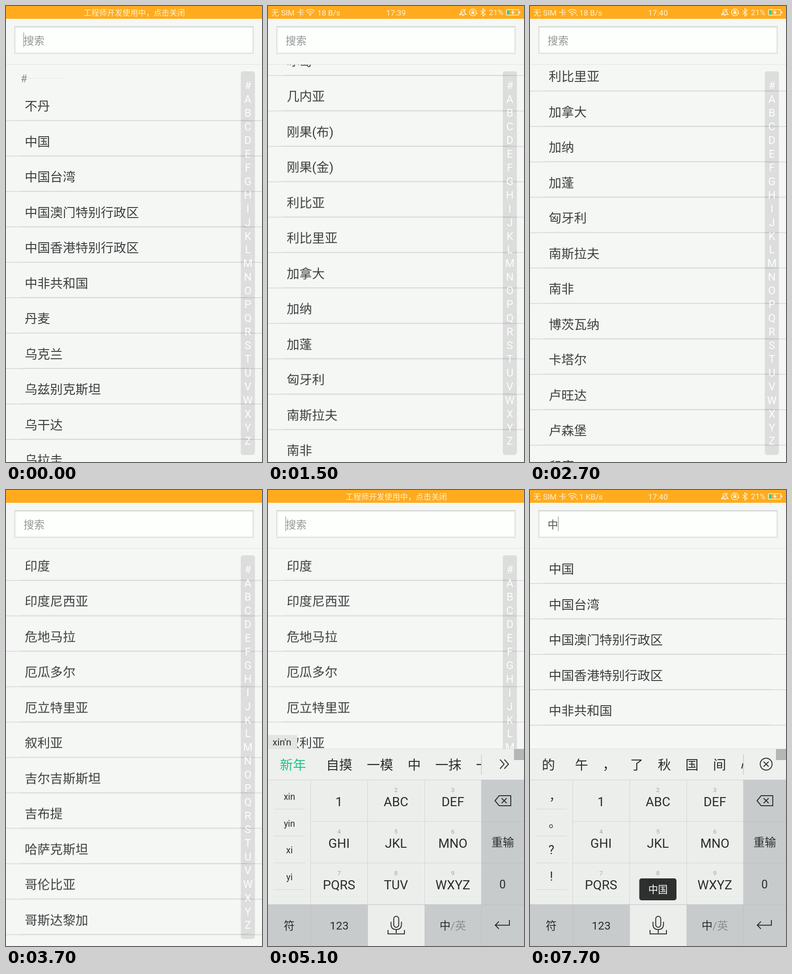
An HTML page for the animation above (8 s loop, 561x998 px).

```html
<!DOCTYPE html>
<html lang="zh-CN">
<head>
<meta charset="utf-8">
<title>国家列表搜索</title>
<style>
  html, body { margin: 0; width: 100%; height: 100%; overflow: hidden; background: #f5f7f5; }
  svg { display: block; width: 100%; height: 100%; }
  text { font-family: Roboto, "Noto Sans CJK SC", "Noto Sans CJK", sans-serif; white-space: pre; }
  .mid { text-anchor: middle; }
  .row { fill: #3d3f3e; }
  .icon { fill: none; stroke: #2c2e2d; stroke-width: 2; }
  .status { fill: #fff2d6; }
  .status .stroke { fill: none; stroke: #fff2d6; stroke-width: 1.6; }
</style>
</head>
<body>
<svg id="stage" viewBox="0 0 561 998" preserveAspectRatio="none"></svg>
<script>
const LOOP = 8000, PITCH = 77.5;
const COMMIT = 5750;

const text = (x, y, size, str, attrs = '') =>
  `<text x="${x}" y="${y}" font-size="${size}" ${attrs}>${str}</text>`;
const mid = (x, y, size, str, attrs = '') => text(x, y, size, str, 'class="mid" ' + attrs);
const rect = (x, y, w, h, fill, attrs = '') =>
  `<rect x="${x}" y="${y}" width="${w}" height="${h}" fill="${fill}" ${attrs}/>`;
const path = (d, attrs = '') => `<path d="${d}" ${attrs}/>`;
// "on" lists the spans, in ms, in which the group is visible
const during = (on, body) => `<g data-on="${on}">${body}</g>`;

const countries = ('不丹 中国 中国台湾 中国澳门特别行政区 中国香港特别行政区 中非共和国 丹麦 乌克兰 ' +
  '乌兹别克斯坦 乌干达 乌拉圭 乍得 也门 亚美尼亚 以色列 伊拉克 伊朗 伯利兹 佛得角 俄罗斯 保加利亚 ' +
  '克罗地亚 冈比亚 冰岛 几内亚 刚果(布) 刚果(金) 利比亚 利比里亚 加拿大 加纳 加蓬 匈牙利 南斯拉夫 ' +
  '南非 博茨瓦纳 卡塔尔 卢旺达 卢森堡 印度 印度尼西亚 危地马拉 厄瓜多尔 厄立特里亚 叙利亚 ' +
  '吉尔吉斯斯坦 吉布提 哈萨克斯坦 哥伦比亚 哥斯达黎加').split(' ');

function rows(names, top) {
  return names.map((name, i) => {
    const y = top + i * PITCH;
    return text(41, y + 10.3, 27.8, name, 'class="row"') +
      rect(32, y + 30.5, 498, 1, '#e0e2e0') + rect(0, y + 31.3, 561, 1.4, '#d0d3d1');
  }).join('');
}

function sideIndex() {
  const letters = [...'#ABCDEFGHIJKLMNOPQRSTUVWXYZ'];
  return rect(514.5, 143, 31, 839.5, '#000', 'rx="5" opacity=".1"') +
    letters.map((c, i) => mid(530, 182.3 + i * 29.93, 23.5, c, 'fill="#fff" opacity=".93"')).join('');
}

function statusBar() {
  const wifi = path('M83 11.5q9.5-8 19 0M86 15q6.500-5.500 13 0M89 18q3.500-3 7 0', 'class="stroke" stroke-width="2"') +
    '<circle cx="92.500" cy="20" r="1.600"/>';
  const bell = path('M420 18.500q3-2 3-6q0-5 4-5q4 0 4 5q0 4 3 6zM425 20.500h4M433 6.500l-13 14', 'class="stroke"');
  const lock = '<circle cx="449" cy="14" r="7.500" class="stroke"/>' +
    path('M447 13v-2q2-3 4 0v2', 'class="stroke"') + rect(445.7, 12.5, 6.6, 5, '#fff2d6') + path('M455 15h4l-2 3z');
  const bluetooth = path('M466 10l10 8l-5 4v-16l5 4l-10 8', 'class="stroke"');
  const battery = rect(522.5, 8, 27, 12, 'none', 'rx="1.500" class="stroke"') +
    rect(524, 9.5, 5, 9, '#20d29a') + rect(550.5, 12, 2.5, 4, '#fff2d6') + path('M538 8l-6 7h4l-1 5l6-7h-4z');
  const banner = mid(281, 20.5, 17.1, '工程师开发使用中，点击关闭');
  const info = text(7, 20.5, 17.2, '无 SIM 卡') + wifi +
    during('2050-8000', path('M98 17l2-3l2 3zM101 19h4l-2 3z')) +
    during('0-6700', text(108, 20.5, 17.2, '18 B/s')) + during('6700-8000', text(108, 20.5, 17.2, '1 KB/s')) +
    during('0-2050', mid(280.5, 20.5, 17.4, '17:39')) + during('2050-8000', mid(280.5, 20.5, 17.4, '17:40')) +
    bell + lock + bluetooth + text(484, 20.3, 17.2, '21%') + battery;
  return rect(0, 0, 561, 28, '#ffab1d') +
    `<g class="status">${during('0-550,3850-6650', banner)}${during('750-3650,6850-8000', info)}</g>`;
}

function searchBox() {
  const caret = x => rect(x, 58, 1.5, 32, '#a0a3a1');
  return rect(0, 28, 561, 100, '#f5f7f5') + rect(0, 127.3, 561, 1.2, '#e3e6e4') +
    rect(19, 45, 523.5, 59, '#fdfffd') +
    rect(21, 47, 519.5, 55, 'none', 'stroke="#f2f5f2" stroke-width="3"') +
    rect(19, 45.2, 523, 58.6, 'none', 'stroke="#dadddb" stroke-width="1.600"') +
    rect(18.500, 44.5, 524, 1.8, '#d0d3d1') +
    during(`0-${COMMIT}`, text(38.5, 83.5, 23, '搜索', 'fill="#959796"')) +
    during(`${COMMIT}-8000`, text(38.5, 83.5, 23, '中', 'fill="#555756"')) +
    during('0-470,1020-1490,2050-2550,3070-3570,4050-4550,5050-5550', caret(38)) +
    during(`${COMMIT}-6250,6700-7200,7700-8000`, caret(61.2));
}

function candidates(words, first) {
  let x = 26;
  return words.split(' ').map((word, i) => {
    const out = text(x, 611.5, 28.8, word, `fill="${i ? '#2b2d2c' : first}"`);
    x += word.length * 28.8 + 31.7 + (i ? 0 : 12);
    return out;
  }).join('');
}

const syllables = list => list.split(' ').map((s, i) =>
  mid(47, 678 + i * 58.5, 19.5, s, 'fill="#2b2d2c"')).join('');

const punctuation = text(42, 679, 26, '，') + text(41, 738, 26, '。') +
  mid(47, 797, 27, '?') + mid(47, 855, 27, '!');

function composing(on, pinyin, words, list) {
  const width = pinyin.length > 1 ? 64 : 32;
  return during(on, rect(0, 536, width, 30, '#e3e5e3', 'rx="3"') +
    text(10, 559.3, 21, pinyin, 'fill="#2b2d2c"') + candidates(words, '#20c08c') + syllables(list));
}

function keys() {
  const labels = ['1', 'ABC', 'DEF', 'GHI', 'JKL', 'MNO', 'PQRS', 'TUV', 'WXYZ'];
  const grid = labels.map((label, i) => {
    const x = 155.7 + i % 3 * 124.7, y = 692 + Math.floor(i / 3) * 91;
    return mid(x, y, 28, label) + (i ? mid(x, y - 31, 13.5, i + 1, 'fill="#a4a6a5"') : '');
  }).join('');
  const lines = path('M0 634.500H468M94 725.500H468M94 816.500H468M93.500 634V907M218.500 634V907M343.500 634V907' +
    'M12 698.500H81M12 757.500H81M12 816H81M12 874.500H81', 'fill="none" stroke="#d2d5d3"');
  return rect(0, 634, 468, 274, '#eceeec') + rect(468, 634, 93, 364, '#c8cbcc') +
    rect(0, 907.5, 468, 90.5, '#c8cbcc') + rect(219, 907.5, 124, 90.5, '#eceeec') + lines +
    path('M0 907.500H561M93.500 907V998M468 634V998M468 725.500H561M468 816.500H561', 'stroke="#bdc0c2" fill="none"') +
    `<g fill="#2b2d2c">${grid}${mid(514.5, 780, 24.7, '重输')}${mid(514, 871.5, 25, '0')}` +
    mid(46.5, 961.5, 24, '符') + mid(156, 961.5, 24.5, '123') +
    text(376, 961.5, 24, '中<tspan fill="#8c9092">/英</tspan>') + '</g>' +
    `<g class="icon">${path('M497.500 680l9-11h25.500v22h-25.500zM512 674.500l11 11m0-11l-11 11')}` +
    path('M529 941v11.500h-31m8-8l-8 8l8 8') +
    rect(275.5, 933, 11, 24, 'none', 'rx="5.500"') +
    path('M269.500 945v5q0 12 11.500 12t11.500-12v-5M281 962v8M263 963v8.500h36v-8.500') + '</g>';
}

function keyboard() {
  return rect(0, 566, 561, 69, '#eef0ee') + rect(0, 566, 561, 1, '#dcdfdd') + keys() +
    composing('4600-4800', 'y', '一 在 我 要 有 这 也', 'w x y z') +
    composing('4800-4980', 'xi', '一 西 以 洗 已 系 细', 'xi yi zi w') +
    composing('4980-5080', 'xin', '新 心 因 信 银 引 印', 'xin yin xi yi') +
    composing('5080-5350', "xin'n", '新年 自摸 一模 中 一抹 一', 'xin yin xi yi') +
    composing(`5350-${COMMIT}`, 'zhong', '中 种 重 众 钟 终 忠', 'zhong xin yin xi') +
    during(`0-4600,${COMMIT}-8000`, `<g fill="#2b2d2c">${punctuation}</g>`) +
    during(`${COMMIT}-8000`, candidates('的 午 ， 了 秋 国 间 心', '#2b2d2c')) +
    rect(468, 567, 93, 67, '#eef0ee') + rect(467, 578, 1.3, 45, '#c4c7c5') +
    `<g class="icon" stroke-width="1.600">` +
    during(`4600-${COMMIT}`, path('M508.500 590l9 10l-9 10M518 590l9 10l-9 10')) +
    during(`${COMMIT}-8000`, '<circle cx="517.500" cy="600" r="13"/>' + path('M512 594.500l11 11m0-11l-11 11')) + '</g>' +
    rect(539, 567, 22, 24, '#b5b7b6');
}

const stage = document.getElementById('stage');
stage.innerHTML = rect(0, 0, 561, 998, '#f5f7f5') +
  during(`0-${COMMIT}`, `<g id="list">${text(32, 166.5, 23, '#', 'fill="#8a8c8b"')}` +
    rect(48, 157.5, 77, 1, '#e6e8e6') + rows(countries, 219) + '</g>' + sideIndex()) +
  during(`${COMMIT}-8000`, rows(countries.slice(1, 6), 172.7)) +
  searchBox() + statusBar() +
  `<g id="keyboard">${keyboard()}</g>` +
  `<g id="toast">${rect(239.5, 850, 81.5, 48, '#282a29', 'rx="5" opacity=".97"')}` +
  mid(280.5, 882, 21.3, '中国', 'fill="#fff"') + '</g>';

const play = (el, frames) => el.animate(frames, { duration: LOOP, iterations: Infinity });

for (const el of stage.querySelectorAll('[data-on]')) {
  const key = (ms, opacity) => ({ offset: ms / LOOP, opacity, easing: 'steps(1, end)' });
  const spans = el.dataset.on.split(',').map(s => s.split('-').map(Number));
  const frames = spans.flatMap(([from, to]) => [key(from, 1), key(to, 0)]);
  if (spans[0][0] > 0) frames.unshift(key(0, 0));
  if (spans.at(-1)[1] < LOOP) frames.push(key(LOOP, 0));
  play(el, frames);
}

const scrollTo = (ms, y, easing = 'linear') =>
  ({ offset: ms / LOOP, transform: `translateY(${-y}px)`, easing });
play(document.getElementById('list'), [
  scrollTo(0, 0), scrollTo(50, 0, 'cubic-bezier(.35, .2, .5, 1)'),
  scrollTo(600, 759.5), scrollTo(750, 759.5, 'cubic-bezier(.3, .35, .55, .95)'),
  scrollTo(1500, 1881, 'cubic-bezier(.2, .5, .5, 1)'),
  scrollTo(1900, 1935), scrollTo(2230, 1935, 'cubic-bezier(.5, .1, .8, .65)'),
  scrollTo(2700, 2233, 'cubic-bezier(.25, .4, .45, 1)'),
  scrollTo(3400, 3075.5), scrollTo(LOOP, 3075.5)
]);

const slide = (ms, y, easing = 'linear') => ({ offset: ms / LOOP, transform: `translateY(${y}px)`, easing });
play(document.getElementById('keyboard'), [
  slide(0, 465), slide(3800, 465, 'cubic-bezier(.2, .6, .4, 1)'), slide(4200, 0), slide(LOOP, 0)
]);

play(document.getElementById('toast'), [
  { offset: 0, opacity: 0 }, { offset: 6900 / LOOP, opacity: 0 },
  { offset: 7200 / LOOP, opacity: 1 }, { offset: 1, opacity: 1 }
]);
</script>
</body>
</html>
```
